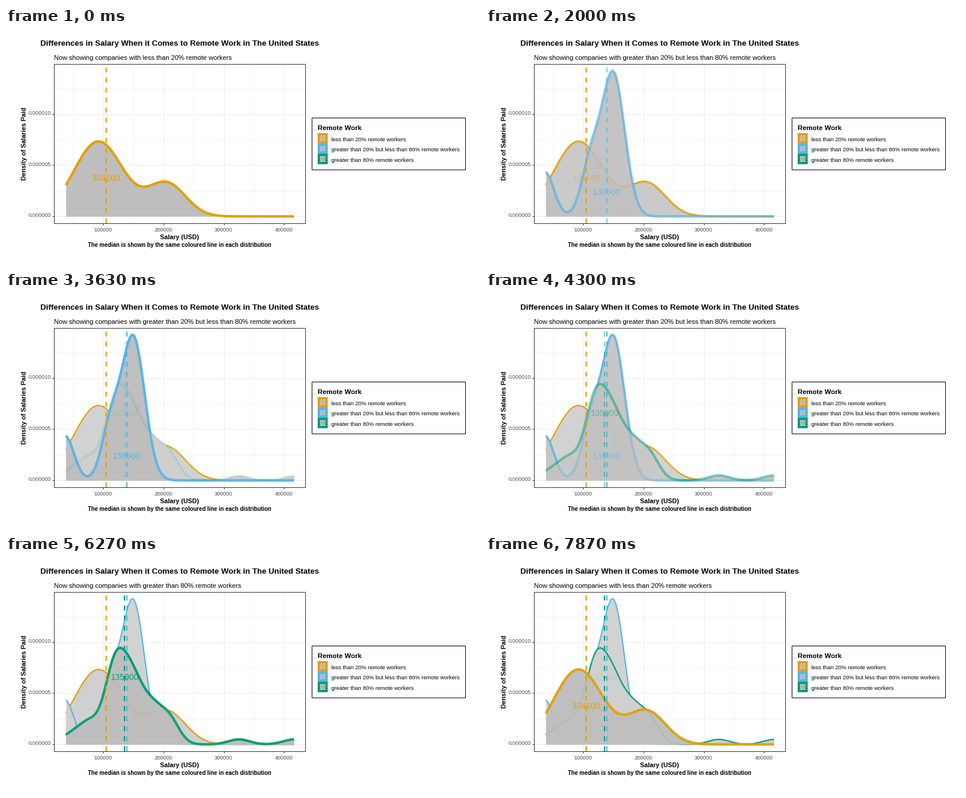
A matplotlib script that plays this animation: 800 by 400 pixels, repeating every 8000 ms.

```python
import numpy as np
import matplotlib.pyplot as plt
from matplotlib.animation import FuncAnimation
from matplotlib.patches import Rectangle

plt.rcParams["font.family"] = "Liberation Sans"

W, H, DPI = 800, 400, 100
PT = 72 / DPI                      # points per pixel
FRAMES, STEP = 100, 80
CYCLE = FRAMES * STEP / 3
HOLD = 830
LEFT, TOP, RIGHT, BOTTOM, BASE = 81, 61, 505, 331, 319.3
GREY, PALE = "#BEBEBE", "#D2D2D2"

fig = plt.figure(figsize=(W / DPI, H / DPI), dpi=DPI, facecolor="white")
ax = fig.add_axes([0, 0, 1, 1])
ax.set(xlim=(0, W), ylim=(H, 0))
ax.axis("off")


def sal_x(value):
    return 164.6 + (value - 1e5) * 101.7e-5


def den_y(value):
    return BASE - value * 86.5 / 5e-6


def label(x, y, text, size, **kw):
    return ax.text(x, y, text, fontsize=size * PT, va="baseline", **kw)


def line(xs, ys, color, width, z, **kw):
    return ax.plot(xs, ys, color=color, lw=width * PT, zorder=z,
                   solid_capstyle="butt", **kw)[0]


def box(x, y, w, h, z=1, **kw):
    return ax.add_patch(Rectangle((x, y), w, h, zorder=z, **kw))


# Panel, grid and axes; half a pixel off so that lines snap to whole pixels
for i in range(8):
    x = sal_x(5e4 * (i + 1)) - 0.5
    major = i % 2 == 1
    line([x, x], [TOP, BOTTOM], "#EBEBEB", 1 if major else 0.6, 1)
    if major:
        line([x, x], [BOTTOM, BOTTOM + 3], "#333333", 1, 1)
        label(x, 345.3, f"{(i + 1) * 50000}", 9.1, ha="center", color="#4D4D4D")
for i in range(6):
    y = den_y(2.5e-6 * i) - 0.5
    major = i % 2 == 0
    line([LEFT, RIGHT], [y, y], "#EBEBEB", 1 if major else 0.6, 1)
    if major:
        line([LEFT - 3, LEFT], [y, y], "#333333", 1, 1)
        label(76, y + 1.6, f"{2.5e-6 * i:.6f}", 9.1, ha="right", color="#4D4D4D")
box(LEFT, TOP, RIGHT - LEFT, BOTTOM - TOP, 9, fill=False, ec="#333333", lw=PT)

MID = (LEFT + RIGHT) / 2
bold = dict(weight="bold", ha="center")
label(MID, 30, "Differences in Salary When it Comes to Remote Work in The United States",
      13.34, **bold)
label(MID, 358, "Salary (USD)", 10.7, **bold)
label(MID, 371, "The median is shown by the same coloured line in each distribution",
      9.63, **bold)
label(34, 196.5, "Density of Salaries Paid", 10.85, rotation=90,
      rotation_mode="anchor", **bold)
subtitle = label(81, 54, "", 11.1)

# name, colour, median, label baseline, (centre, height, spread) of each bump
SERIES = [
    ("less than 20% remote workers", "#E69F00", 104500, 259,
     [(156, 127, 41.5), (271, 56, 32)]),
    ("greater than 20% but less than 80% remote workers", "#56B4E9", 138500, 283,
     [(99, 76, 15.5), (176.7, 88, 15.5), (214.7, 242, 19.3)]),
    ("greater than 80% remote workers", "#009E73", 135000, 210,
     [(112, 18, 18), (141, 32, 16), (184.5, 135, 18), (214, 90, 17), (244.5, 55, 17),
      (275, 43, 17), (393, 8.5, 18), (487, 8.5, 19)]),
]

# Legend
box(516, 152, 259, 88, fc="white", ec="black", lw=PT)
label(526, 173, "Remote Work", 11.5, weight="bold")
for k, (name, color, *_) in enumerate(SERIES):
    y = 178.3 + 17.4 * k
    box(526, y, 17.3, 17.4, 2, fc=color, lw=0)
    box(530, y + 4, 9.3, 9.4, 3, fc=GREY, lw=0)
    label(534.7, y + 12.2, "a", 12, ha="center", color=color, alpha=0.45, zorder=4)
    label(549, y + 13.6, name, 9.36)


class Density:
    """One distribution: a fading main copy above a thin lasting mark."""

    def __init__(self, k, name, color, median, text_y, bumps):
        self.name = name
        self.z = z = 0.2 * k
        xs = np.linspace(101, 486, 400)
        ys = BASE - sum(a * np.exp(-((xs - m) / s) ** 2 / 2) for m, a, s in bumps)
        mx = sal_x(median)

        def area(shade, z):
            return ax.fill_between(xs, ys, BASE, color=shade, lw=0, zorder=z)

        def rule(z):
            return line([mx, mx], [BOTTOM, TOP], color, 2.13, z, ls=(0, (4, 4)))

        self.mark_fill = area(PALE, 2 + z)
        self.mark = [
            line(xs, ys, color, 2.13, 2.1 + z),
            rule(5 + z),
            line([mx - 3, mx + 3], [text_y - 4.7] * 2, color, 1.3, 7, alpha=0.8),
        ]
        self.fill = area(GREY, 3 + z)
        self.curve = line(xs, ys, color, 4.27, 3.1 + z)
        self.main = [
            self.fill,
            self.curve,
            rule(6 + z),
            label(mx, text_y, str(median), 14.3, ha="center", color=color, zorder=8 + z),
        ]

    def show(self, fade, filled, marked, entering):
        self.mark_fill.set_visible(filled)
        for a in self.mark:
            a.set_visible(marked)
        for a in self.main:
            a.set_visible(fade > 0)
            a.set_alpha(fade)
        # an entering distribution lies over the leaving one
        self.fill.set_zorder(3 + entering + self.z)
        self.curve.set_zorder(3.1 + entering + self.z)


plots = [Density(k, *s) for k, s in enumerate(SERIES)]


def draw(i):
    cur, ms = divmod(i * STEP, CYCLE)
    cur = int(cur)
    nxt = (cur + 1) % 3
    u = max(0.0, (ms - HOLD) / (CYCLE - HOLD))
    fades = [0.0] * 3
    fades[cur] = 1 - u
    fades[nxt] = u ** 0.8
    for k, p in enumerate(plots):
        marked = k < cur or (k == cur and u > 0)
        p.show(fades[k], marked or (k == nxt and u > 0), marked, k == nxt)
    closest = plots[nxt if u >= 0.5 else cur]
    subtitle.set_text(f"Now showing companies with {closest.name}")
    return []


anim = FuncAnimation(fig, draw, frames=FRAMES, interval=STEP, repeat=True,
                     repeat_delay=0, init_func=lambda: draw(0))
plt.show()
```
